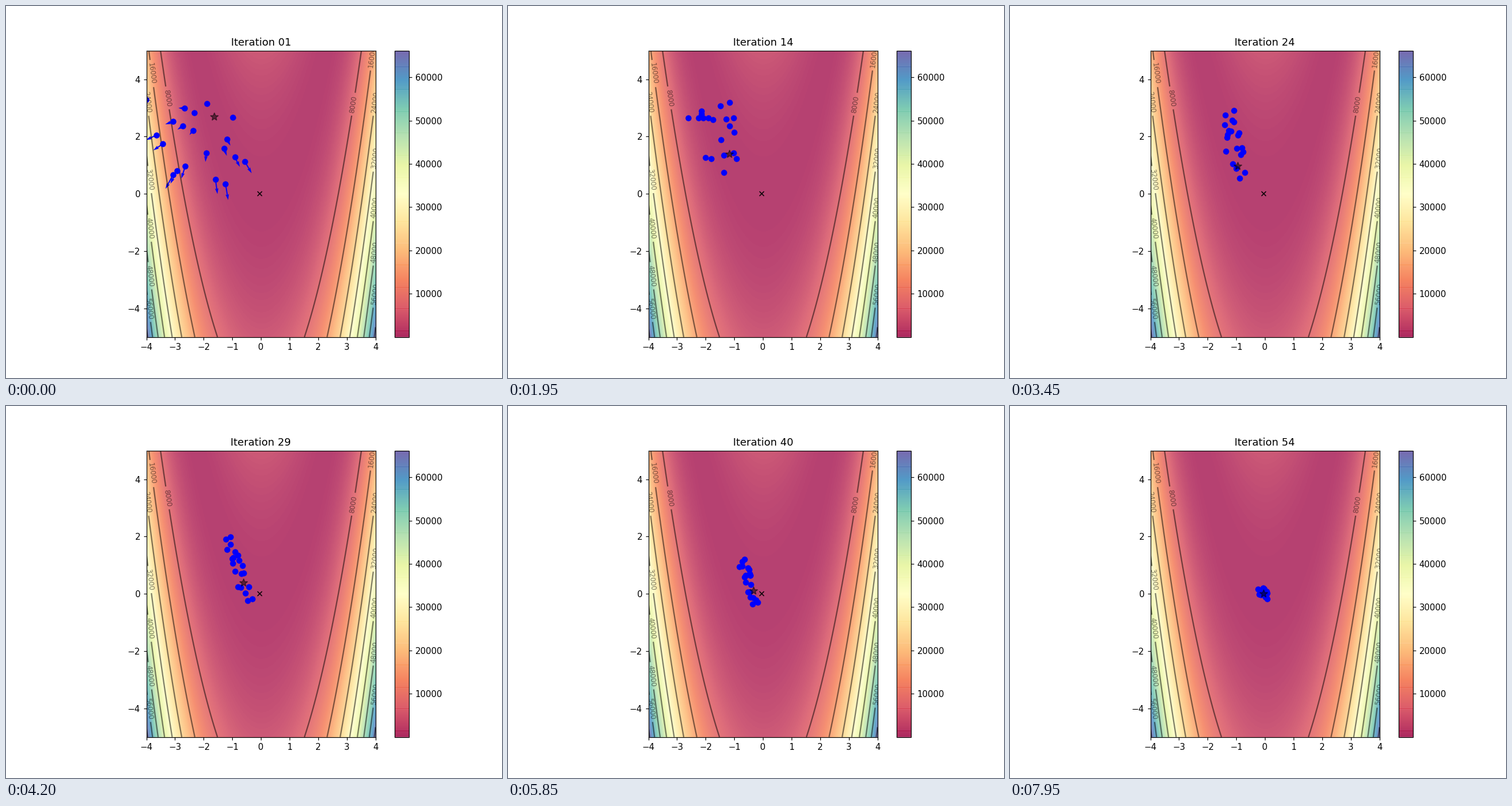
Write a matplotlib script that moves like this. It is 864 px wide and 648 px high and loops after 8 s.

```python
import numpy as np
import matplotlib.pyplot as plt
from matplotlib.animation import FuncAnimation

INTERVAL = 50
FRAMES = 160
FRAMES_PER_STEP = 3
PARTICLES = 20
STEEPNESS = 150
PIXELS_PER_UNIT = 49.9
CENTER = np.array([443.9, 327.0])

# Shape of the swarm at a few iterations, in stage pixels.
KEYS = [1, 8, 20, 29, 35, 45, 54]
SWARM_X = [333, 348, 379, 402, 405, 430, 441]
SWARM_Y = [236, 234, 195, 276, 279, 322, 324]
WIDTH = [48, 33, 10, 6, 7, 5, 6]
HEIGHT = [46, 43, 42, 38, 36, 12, 5]
LEAN = [8, 8, 3, 14, 13, 4, 3]
BEST_X = [363, 383, 388, 414, 424, 438, 442]
BEST_Y = [193, 251, 264, 308, 320, 326, 327]

# Every particle keeps an offset in the swarm and slowly circles its middle.
rng = np.random.default_rng(4)
ACROSS = rng.permutation(np.linspace(-1.6, 1.6, PARTICLES))
ALONG = np.linspace(-1.6, 1.6, PARTICLES)
TURN = rng.normal(0, 0.03, PARTICLES)


def to_data(x, y):
    return (np.column_stack([x, y]) - CENTER) * [1, -1] / PIXELS_PER_UNIT


def keyed(values, iteration):
    return np.interp(iteration, KEYS, values)


def positions(iteration):
    angle = TURN * (iteration - 1)
    across = ACROSS * np.cos(angle) - ALONG * np.sin(angle)
    along = ACROSS * np.sin(angle) + ALONG * np.cos(angle)
    x = (keyed(SWARM_X, iteration) + keyed(WIDTH, iteration) * across
         + keyed(LEAN, iteration) * along)
    y = keyed(SWARM_Y, iteration) + keyed(HEIGHT, iteration) * along
    return to_data(x, y)


def velocities(iteration):
    """Drift of the swarm plus an outward burst that soon fades."""
    here = positions(iteration)
    burst = 0.22 * np.exp((1 - iteration) / 2)
    drift = 0.5 * (positions(iteration + 1) - here)
    return drift + burst * (here - to_data(358, 182))


def best_position(iteration):
    """The best point improves in jumps of three iterations."""
    found = iteration - (iteration + 1) % 3
    return to_data(keyed(BEST_X, found), keyed(BEST_Y, found))


def contour_x(level, y):
    return np.sqrt(y + np.sqrt(level / STEEPNESS))


fig, ax = plt.subplots(figsize=(8, 6), dpi=108)
X, Y = np.meshgrid(np.linspace(-4, 4, 200), np.linspace(-5, 5, 250))
Z = X**2 + STEEPNESS * (Y - X**2)**2
image = ax.imshow(Z, extent=(-4, 4, -5, 5), origin="lower",
                  cmap="Spectral", alpha=0.75)
bar = fig.colorbar(image, ax=ax)
bar.solids.set_snap(False)  # overlapping cells give the fine stripes

levels = np.arange(8000, 65000, 8000)
lines = ax.contour(X, Y, Z, levels, colors="black", alpha=0.5)
ax.plot(-0.05, 0.01, "kx", markersize=5)

arrows = ax.quiver(*positions(1).T, *velocities(1).T, color="blue",
                   width=0.005, angles="xy", scale_units="xy", scale=1)
dots, = ax.plot(*positions(1).T, "bo")
star, = ax.plot(*best_position(1).T, "k*", markersize=10, alpha=0.5)
title = ax.set_title("Iteration 01")
ax.set(xlim=(-4, 4), ylim=(-5, 5))

# Contour labels need the final layout to find their gaps.
fig.canvas.draw()
left_heights = [3.35, 4.2, 3.2, 0.5, -1.2, -2.86, -4.0]
right_heights = [3.13, 4.78, 3.2, 1.25, -0.48, -2.03, -3.5]
spots = [(side * contour_x(level, y), y)
         for side, heights in ((-1, left_heights), (1, right_heights))
         for level, y in zip(levels, heights)]
ax.clabel(lines, inline=True, fontsize=8, manual=spots)


def update(frame):
    iteration = 1 + frame // FRAMES_PER_STEP
    here = positions(iteration)
    dots.set_data(*here.T)
    arrows.set_offsets(here)
    arrows.set_UVC(*velocities(iteration).T)
    star.set_data(*best_position(iteration).T)
    title.set_text(f"Iteration {iteration:02d}")
    return dots, arrows, star, title


animation = FuncAnimation(fig, update, frames=FRAMES, interval=INTERVAL,
                          repeat=True, repeat_delay=0)
plt.show()
```
